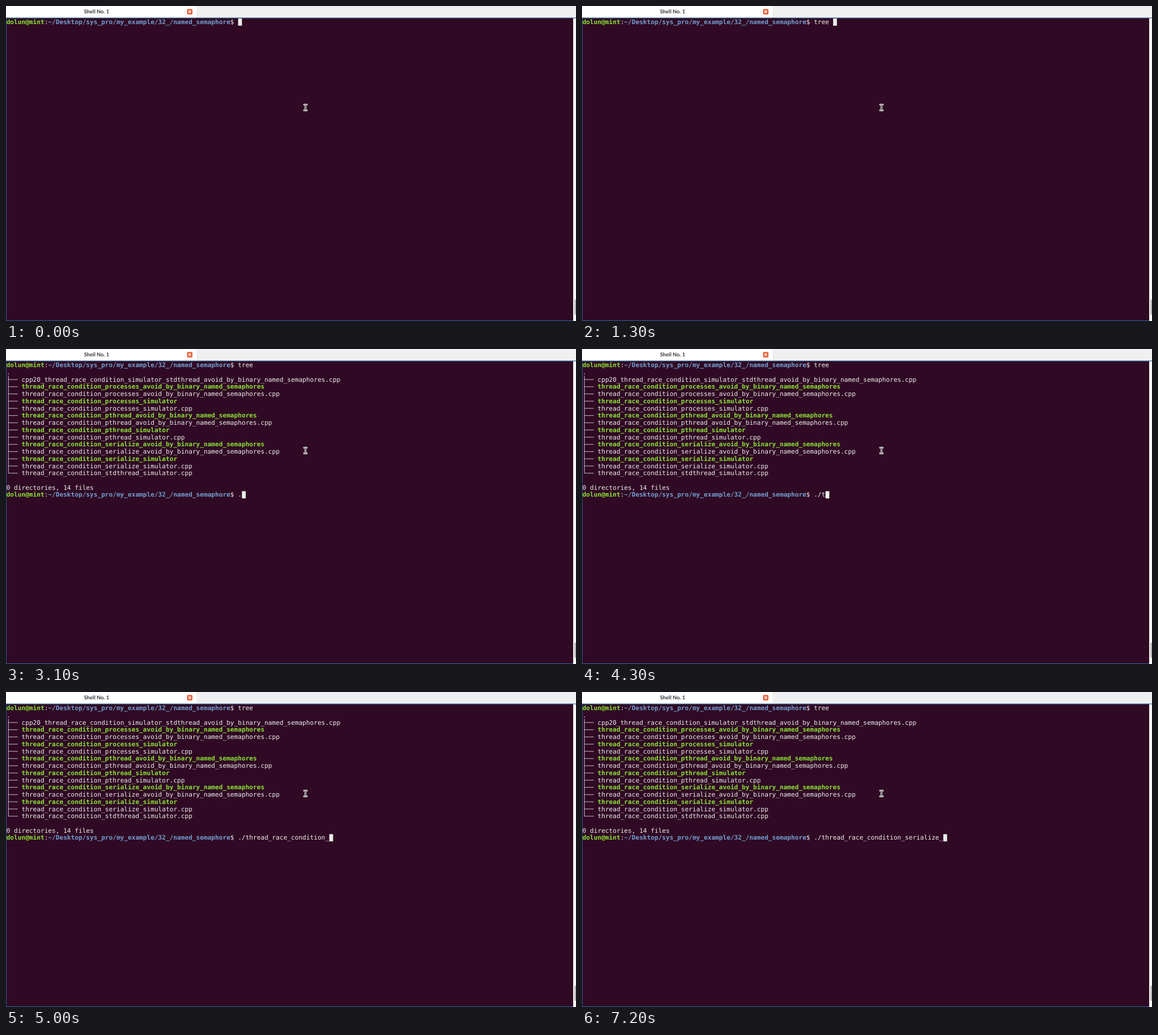
Recreate the animation shown at these times as an HTML page. Size 1006 px wide and 557 px high, loop 8 s.

```html
<!DOCTYPE html>
<html lang="en">
<head>
<meta charset="utf-8">
<title>Terminal session</title>
<style>
  html, body { margin: 0; height: 100%; overflow: hidden; background: #300a24; }
  svg { display: block; width: 1006px; height: 557px; }
  text { white-space: pre; text-rendering: geometricPrecision; }
  #screen { font: 11.137px "DejaVu Sans Mono", monospace; fill: #eeeeec; }
  .bold { font-weight: bold; }
  .green { fill: #8ae234; }
  .blue { fill: #729fcf; }
  .tab { font: bold 9.3px Lato, sans-serif; fill: #333; }
</style>
</head>
<body>
<svg viewBox="0 0 1006 557">
  <rect width="1006" height="557" fill="#300a24"/>

  <!-- tab bar -->
  <rect width="1006" height="21" fill="#f0f0f0"/>
  <rect width="336" height="21" fill="#fff"/>
  <text class="tab" x="160" y="13.3" text-anchor="middle">Shell No. 1</text>
  <rect x="319.5" y="5.3" width="9.6" height="9.6" rx="1.8" fill="#e9633f"/>
  <path d="M322.3 8.1l4 4m0-4l-4 4" stroke="#fff" stroke-width="1.4"/>

  <!-- scrollbar and focus border -->
  <rect x="1001" y="21" width="5" height="536" fill="#f7f7f7"/>
  <rect x="1003" y="519" width="3" height="27" rx="1" fill="#bcbcbc"/>
  <path d="M0 21.2H1006" stroke="#3a6f9c" stroke-width="1.3"/>
  <path d="M.4 21V556.4H1001" fill="none" stroke="#2a78b4" stroke-width=".9"/>

  <g id="screen" transform="translate(.67 22.1)">
    <g id="listing"></g>
    <g id="prompts"></g>
    <rect id="cursor" width="6.705" height="12.74"/>
  </g>

  <!-- mouse pointer -->
  <g fill="none" stroke-linecap="square">
    <path id="beam" d="M526.5 174.5h1l1 1 1-1h1M528.5 175.5v8M526.5 184.5h1l1-1 1 1h1" stroke="#fff" stroke-width="2.8"/>
    <use href="#beam"/>
    <path d="M526.5 174.5h1l1 1 1-1h1M528.5 175.5v8M526.5 184.5h1l1-1 1 1h1" stroke="#1a1016" stroke-width="1"/>
  </g>
</svg>
<script>
const CELL = 6.705, LINE = 12.74, BASE = 10.06, LOOP = 8000;
const PROMPT_COLS = 61, TREE_DONE = 1900, LAST_ROW = 18;
const $ = id => document.getElementById(id);

const line = (row, col, content, cls = '') =>
  `<text x="${col * CELL}" y="${row * LINE + BASE}" class="${cls}">${content}</text>`;

const prompt = (row, command) => line(row, 0,
  '<tspan class="bold green">dolun@mint</tspan>:' +
  '<tspan class="bold blue">~/Desktop/sys_pro/my_example/32_/named_semaphore</tspan>$ ' + command);

const race = 'thread_race_condition_';
const avoid = 'avoid_by_binary_named_semaphores';
const files = [`cpp20_${race}simulator_stdthread_${avoid}.cpp`];
for (const kind of ['processes', 'pthread', 'serialize'])
  for (const variant of [avoid, 'simulator']) {
    const name = `${race}${kind}_${variant}`;
    files.push(name, name + '.cpp');
  }
files.push(`${race}stdthread_simulator.cpp`);

// Tree branches are drawn as thin lines through the cell centres.
const middle = row => row * LINE + 6.4;
let branches = `M3.6 ${2 * LINE}V${middle(files.length + 1)}`;
files.forEach((_, i) => branches += `M3.6 ${middle(i + 2)}H${3 * CELL}`);

$('listing').innerHTML = line(1, 0, '.') +
  files.map((name, i) => line(i + 2, 4, name, name.endsWith('.cpp') ? '' : 'bold green')).join('') +
  `<path d="${branches}" fill="none" stroke="#eeeeec" stroke-width=".8"/>` +
  line(17, 0, '0 directories, 14 files');

// What stands on the active command line from each time on.
const typed = [
  [0, ''],
  [1100, `./${race}processes_${avoid} `],
  [1300, 'tree '],
  [TREE_DONE, ''],
  [3100, '.'],
  [3500, './'],
  [4300, './t'],
  [4400, './th'],
  [4500, './thr'],
  [4600, './thre'],
  [5000, `./${race}`],
  [6400, `./${race}s`],
  [7200, `./${race}serialize_`],
];

let shown;
function draw() {
  const time = performance.now() % LOOP;
  const step = typed.findLast(([start]) => start <= time);
  if (step !== shown) {
    shown = step;
    const [start, command] = step;
    const listed = start >= TREE_DONE;
    const row = listed ? LAST_ROW : 0;
    $('listing').style.display = listed ? '' : 'none';
    $('prompts').innerHTML = (listed ? prompt(0, 'tree') : '') + prompt(row, command);
    $('cursor').setAttribute('x', (PROMPT_COLS + command.length) * CELL);
    $('cursor').setAttribute('y', row * LINE);
  }
  requestAnimationFrame(draw);
}
draw();
</script>
</body>
</html>
```
